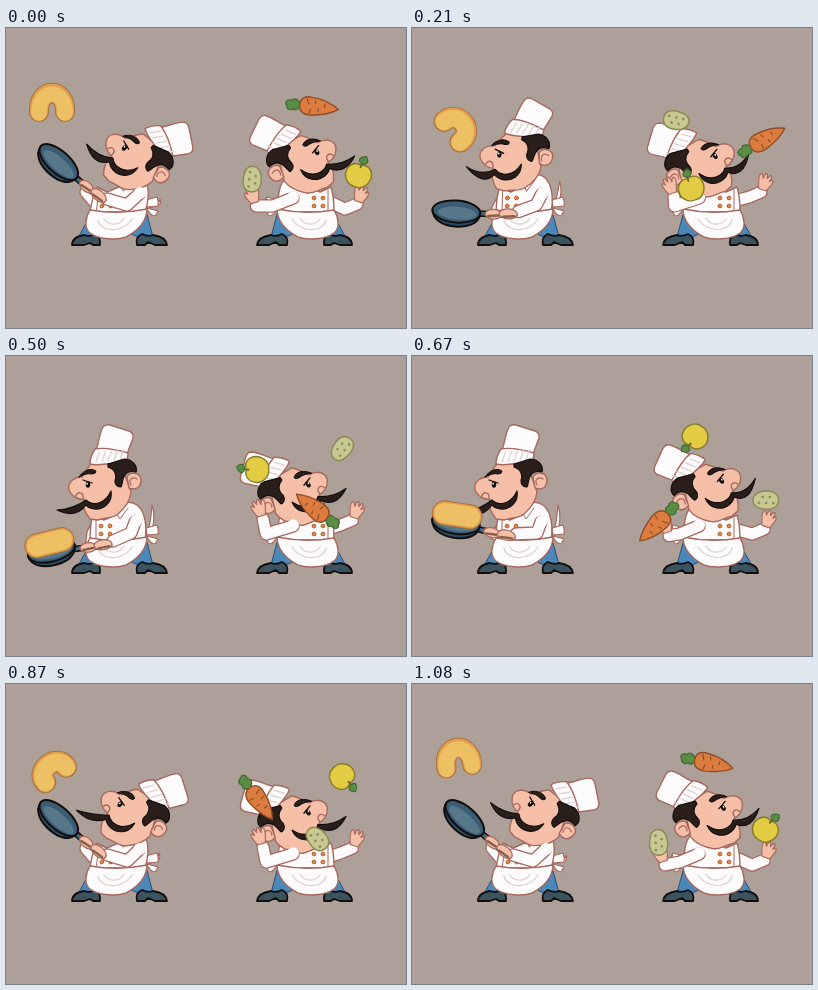
An HTML page with a canvas that plays this animation: 400x300 px, repeating every 1120 ms.

```html
<!DOCTYPE html>
<html lang="en">
<head>
<meta charset="utf-8">
<title>Two chefs</title>
<style>
  html, body { margin: 0; width: 100%; height: 100%; overflow: hidden; background: #ada098; }
  canvas { display: block; width: 400px; height: 300px; }
</style>
</head>
<body>
<canvas id="stage" width="400" height="300"></canvas>
<script>
const ctx = document.getElementById('stage').getContext('2d');
const LOOP = 1120, COUNT = 27, BEAT = 9;
const LINE = '#a5695f', SKIN = '#f6bfa7', WHITE = '#fdfbfb', INK = '#120e0e', HAIR = '#2a1e1a';
const PLEAT = '#dcd2d0', BLUE = '#4b87b8', SHOE = '#3a535f', LEAF = '#5a8c44', WOOD = '#86604a';

// ---- timing: 24 steps a second, starts rounded to 10 ms ----
const startOf = n => Math.ceil(n * 12.5 / 3 - 0.5) * 10;
function stepAt(ms) {
  let n = COUNT - 1;
  while (startOf(n) > ms) n--;
  return n;
}

// ---- maths ----
const rad = deg => deg * Math.PI / 180;
const mix = (a, b, t) => a + (b - a) * t;
const blend = (a, b, t) => a.map((v, i) => mix(v, b[i], t));
const smooth = x => { const t = Math.min(1, Math.max(0, x)); return t * t * (3 - 2 * t); };
const beat = (n, peak) => Math.cos(2 * Math.PI * (n - peak) / BEAT);

// ---- drawing helpers ----
function draw(d, fill, stroke, width = 1.4) {
  const p = typeof d === 'string' ? new Path2D(d) : d;
  if (fill) { ctx.fillStyle = fill; ctx.fill(p); }
  if (stroke) { ctx.strokeStyle = stroke; ctx.lineWidth = width; ctx.stroke(p); }
}
function oval(x, y, rx, ry, fill, stroke, width) {
  const p = new Path2D();
  p.ellipse(x, y, rx, ry, 0, 0, 7);
  draw(p, fill, stroke, width);
}
function at(x, y, rot, paint, flip = 1) {
  ctx.save();
  ctx.translate(x, y);
  ctx.scale(flip, 1);
  ctx.rotate(rad(rot));
  paint();
  ctx.restore();
}
function sleeve(...points) {
  const d = 'M' + points.map(p => p.join()).join('L');
  draw(d, null, LINE, 13.4);
  draw(d, null, WHITE, 10.8);
}

// ---- chef parts, facing left ----
function hat() {
  draw('M90 94C93 87 93 78 97 71Q99 68 104 69L123 75Q128 77 127 82L121 98C111 94 100 92 90 94Z', WHITE, LINE);
  draw('M84 108C84 102 87 96 89 93C100 91 112 94 122 97C122 102 120 107 117 108C106 105 94 111 84 108Z', WHITE, LINE);
  for (let i = 0; i < 5; i++) draw(`M${90 + 6 * i} ${106 - i * .5}l3.5 -10`, null, PLEAT, 1.3);
}
function moustache(tip) {
  draw(`M${tip}Q68 153 80 144C86 150 99 149 105 135C107 147 97 154 88 153Q82 152 80 149Q70 163 ${tip}Z`, HAIR, INK, 1.2);
}
function head([x, y, rot, tilt], tip, flip) {
  at(x, y, rot, () => {
    ctx.translate(-128, -126);
    draw('M87 106C81 111 79 118 76 121C66 121 60 129 64 136C67 141 73 144 78 143C76 150 80 158 84 163L92 164C100 161 106 163 112 158C119 152 124 146 125 136L114 105Z', SKIN, LINE);
    draw('M121 121C124 115 135 116 135 124C135 131 130 135 123 132Z', SKIN, LINE);
    draw('M125 129C122 124 126 120 131 123', null, LINE, 1.2);
    at(105, 107, tilt, () => { ctx.translate(-105, -107); hat(); });
    draw('M102 108L118 103C126 103 132 110 130 116C126 115 122 115 119 119C116 122 117 127 115 131C112 131 109 129 109 125C111 118 108 113 102 111Z', HAIR, INK, 1.2);
    draw('M73 121C77 115 84 111 90 115Q90 118 86 118C81 117 77 119 73 121Z', HAIR, INK, 1);
    draw('M77 124L86 127', null, INK, 1.3);
    oval(82, 128.5, 2.2, 3.3, INK);
    oval(81.2, 127.8, .8, 1, WHITE);
    draw('M70 140C71 135 78 136 77 142', null, LINE, 1.4);
    moustache(tip);
  }, flip);
}
function lowerBody(tailX, tailY) {
  draw('M84 188L73 208H88L96 200Z', BLUE, '#2b4f74', 1);
  draw('M116 202L132 209H147L140 183Z', BLUE, '#2b4f74', 1);
  draw('M66 217C66 210 72 208 78 207Q85 209 89 206Q95 209 94 217H87L84 215L78 217Z', SHOE, INK, 1.8);
  draw('M131 217Q129 209 136 206Q142 209 147 207C154 208 160 210 161 217H149L142 214L139 217Z', SHOE, INK, 1.8);
  draw(`M140 179C145 172 ${tailX - 1} ${tailY + 8} ${tailX} ${tailY}C${tailX + 3} ${tailY + 9} 149 176 140 181Z`, WHITE, LINE, 1.2);
  draw('M140 172L151 169Q153 174 152 178L141 179ZM141 180L152 183L149 188Q145 188 141 181Z', WHITE, LINE, 1.2);
}
function torso(lean) {
  ctx.save();
  ctx.transform(1, 0, -lean, 1, lean * 184, 0);
  draw('M87 159C84 168 84 176 84 184H139C141 172 140 156 131 149C126 145 119 146 115 148L111 158L98 164Z', WHITE, LINE);
  draw('M90 162V182M111 158L114 163L122 152', null, LINE, 1);
  for (const x of [95, 104]) for (const y of [170, 178]) oval(x, y, 1.9, 1.9, '#e58a48', '#a85a30', .9);
  ctx.restore();
}
function apron() {
  draw('M84 182C79 190 78 200 84 205C93 212 112 212 120 209C132 203 141 193 141 181C122 185 102 185 84 182Z', WHITE, LINE);
  draw('M92 192C95 205 117 205 126 191M98 191C102 198 114 198 118 190', null, PLEAT, 1.3);
}
function hand(x, y, rot, flip) {
  at(x, y, rot, () =>
    draw('M-4 8C-6 3 -8 -2 -7 -6Q-5 -9 -3 -3L-2 -8Q0 -11 1 -4L3 -8Q6 -9 4 -2L6 -4Q9 -4 6 3L4 8Z', SKIN, LINE, 1.2), flip);
}

// ---- left chef ----
const leanAt = n => 1 - smooth(n / 7) + smooth((n - 16) / 6.2);
const liftAt = n => 1 - smooth(n / 6.3) + smooth((n - 12.5) / 7.5);
const dipAt = n => Math.abs(n - 13.5) < 4.5 ? Math.cos((n - 13.5) / 9 * Math.PI) : 0;

// The pan swings around the grip and dips to catch.
function panPose(n) {
  const lift = liftAt(n), dip = dipAt(n);
  const [gx, gy] = blend([104, 188], [98, 172], lift);
  const arm = mix(-2, 40, lift) - 5 * dip;
  return { gx, gy, arm, rot: arm + 2 - 11 * dip,
    x: gx - 59 * Math.cos(rad(arm)), y: gy - 59 * Math.sin(rad(arm)) };
}
function pan({ gx, gy, arm, rot, x, y }) {
  at(gx, gy, arm, () => {
    draw('M-38 1H-12', null, INK, 6.5);
    draw('M-38 1H-30', null, '#34698f', 3.5);
    draw('M-29 1H0', null, WOOD, 5);
  });
  at(x, y, rot, () => {
    draw('M-24 0C-23 11 -11 15 0 15C12 15 23 11 24 0Z', '#2a4d64', INK, 2);
    oval(0, 0, 24, 11, '#3b5c73', INK, 2);
    oval(1, 1.5, 19.5, 6.5, '#57788b');
  });
  at(gx, gy, arm, () => {
    oval(-22, 1, 8, 4.8, SKIN, LINE, 1.2);
    oval(-7, 0, 9, 5, SKIN, LINE, 1.2);
    draw('M-27 3L-17 2M-12 3L-1 2', null, WOOD, 2.4);
  });
}
// Free flight with a speeding turn; near the pan it lies flat in it.
function pancake(n, p) {
  const m = n < 14 ? n : n - COUNT;
  const held = smooth((n - 9.5) / 2.5) - smooth((n - 16) / 5);
  const a = rad(p.rot);
  const [x, y, rot] = blend(
    [46, 73 + .62 * (m + 1.5) ** 2, 8.5 * m + .4 * m * m],
    [p.x + 8 * Math.sin(a), p.y - 8 * Math.cos(a), p.rot + (n < 14 ? 180 : 0)], held);
  const bend = 19 * Math.max(0, 1 - (m / 10) ** 2) * (1 - held), width = 23 - bend * .25;
  const spine = `M-13 ${bend / 2}C-14 ${-bend * .83} 14 ${-bend * .83} 13 ${bend / 2}`;
  at(x, y, rot, () => {
    draw(spine, null, '#a7703a', width + 2);
    draw(spine, null, '#e2a04f', width);
    ctx.translate(0, bend * .06);
    draw(spine, null, '#edc163', width - 3);
  });
}
function leftChef(n) {
  const lean = leanAt(n), shift = lean * 4, p = panPose(n);
  const tipY = 154 + 60 * (leanAt(n + 1) - lean);
  lowerBody(...blend([146, 149], [154, 171], lean));
  sleeve([92 + shift, 168], [87 + shift, 177], [p.gx - 18, p.gy - 3 - lean * 5]);
  torso(lean * .16);
  apron();
  head(blend([128, 126, 0, 0], [155, 148, 41, 20], lean), [51, tipY], 1);
  sleeve([129 + shift, 166], [125 - shift, 177], [p.gx + 3, p.gy - 3 + lean * 2]);
  oval(130 + shift, 165, 6, 6, WHITE);
  pan(p);
  pancake(n, p);
}

// ---- right chef: one body cycle per throw ----
function carrot() {
  draw('M-11 0C-14 -7 -19 -7 -20 -4C-25 -6 -28 -1 -25 1C-25 6 -20 6 -18 4Q-14 7 -11 0Z', LEAF, '#3f6a35', 1.2);
  draw('M-12 0C-12 -8 -6 -10 0 -9C12 -8 22 -3 27 1C19 6 10 8 0 9C-7 9 -12 7 -12 0Z', '#dc7d3f', '#8f4d28', 1.4);
  draw('M-5 -7L-3 -2M3 -6L4 -3M-2 7L-1 3M7 5V2M13 -3V0', null, '#8f4d28', 1.2);
}
function potato() {
  draw('M-2 -13C6 -14 9 -6 9 1C9 9 5 13 -1 12.5C-8 12 -10 5 -9 -2C-8 -8 -7 -12 -2 -13Z', '#c8c893', '#8a8b55', 1.5);
  for (let i = 0; i < 5; i++) oval(i % 2 ? 3 : -3, -7 + 3.6 * i, 1.4, 1.4, '#8f9159');
}
function apple() {
  draw('M0 -10C6 -13 13 -9 13 0C12 8 6 13 1 12C-6 13 -12 8 -13 1C-13 -8 -6 -13 0 -10Z', '#e1cc43', '#857a28', 1.4);
  draw('M0 -8Q0 -11 1 -14', null, '#6b5a25', 1.6);
  draw('M1 -12C-5 -13 -4 -18 3 -20C7 -16 6 -12 1 -12Z', LEAF, '#3f6a35', 1.1);
}

// High arc to the front hand, low pass back, with a short hold in each hand.
function juggle(n) {
  const q = (n + 8) % COUNT;
  if (q < 15) {
    const u = q / 15;
    return [300 - 54 * Math.cos(Math.PI * u), 144 - 264 * u * (1 - u)];
  }
  if (q < 17.5) return blend([354, 144], [352, 148], (q - 15) / 2.5);
  if (q < 24) return blend([352, 148], [247, 166], (q - 17.5) / 6.5);
  return blend([247, 166], [246, 144], (q - 24) / 3);
}
const turn = n => 360 * n / COUNT;
const items = [
  { paint: potato, lag: 9, rot: n => 5 + turn(n) + 55 * Math.sin(rad(turn(n) / 2)) },
  { paint: carrot, lag: 0, rot: n => 5 - turn(n) + 33 * Math.sin(rad(turn(n))) },
  { paint: apple, lag: 18, rot: n => 15 - turn(n) + 55 * Math.sin(rad(turn(n) / 2)) },
];

function rightChef(n) {
  const rear = [252 + 6 * beat(n, 5), 161 + 9 * beat(n, 7.8)];
  const front = [353.5 + 3 * beat(n, 7.5), 159.5 + 7 * beat(n, 8.5)];
  const sway = beat(n, 8.3);
  sleeve([322, 173], [front[0] - 16, front[1] + 15], [front[0] - 4, front[1] + 10]);
  hand(...front, 18, 1);
  at(412, 0, 0, () => { lowerBody(152, 170); torso(0); apron(); }, -1);
  head([266 + 5 * sway, 148.5 - 2.5 * sway, 32, 20 - 6 * sway], [52, 149 + 6 * beat(n, 1.5)], -1);
  sleeve([287, 170], [264 + 4 * beat(n, 7.8), 178], [rear[0] + 4, rear[1] + 11]);
  oval(287, 169, 6, 6, WHITE);
  hand(...rear, 18, -1);
  for (const { paint, lag, rot } of items) at(...juggle(n + COUNT - lag), rot(n), paint);
}

ctx.lineJoin = ctx.lineCap = 'round';
function render() {
  const n = stepAt(performance.now() % LOOP);
  ctx.fillStyle = '#ada098';
  ctx.fillRect(0, 0, 400, 300);
  leftChef(n);
  rightChef(n);
  requestAnimationFrame(render);
}
render();
</script>
</body>
</html>
```
